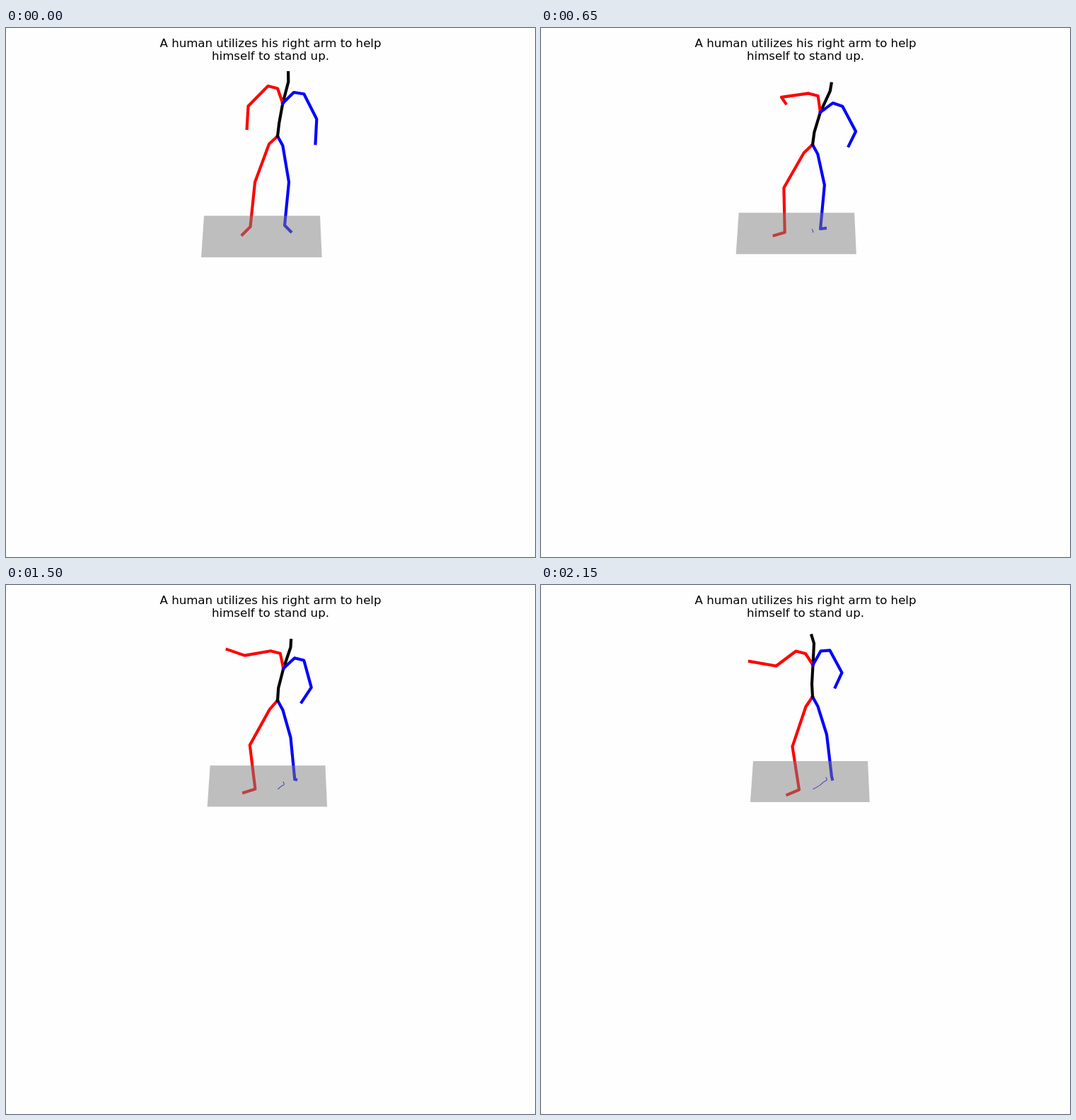
An HTML page for the animation above (2200 ms loop, 748 by 748 pixels).

```html
<!DOCTYPE html>
<html lang="en">
<head>
<meta charset="utf-8">
<title>Standing up</title>
<style>
  html, body { margin: 0; width: 100%; height: 100%; overflow: hidden; background: #fefefe; }
  svg { display: block; width: 100vw; height: 100vh; }
  text { font: 16.62px "DejaVu Sans", sans-serif; text-anchor: middle; }
  path { fill: none; stroke-width: 4.16; stroke-linecap: square; stroke-linejoin: round; }
  .right { stroke: #f00; }
  .left { stroke: #00f; }
  .spine { stroke: #000; }
  #trail { stroke: #00f; stroke-width: 1.04; }
  #floor { fill: rgba(128, 128, 128, .5); }
</style>
</head>
<body>
<svg viewBox="0 0 748 748">
  <text x="374" y="27">A human utilizes his right arm to help</text>
  <text x="374" y="45">himself to stand up.</text>
  <path id="rightLeg" class="right"/>
  <path id="leftLeg" class="left"/>
  <path id="spine" class="spine"/>
  <path id="rightArm" class="right"/>
  <path id="leftArm" class="left"/>
  <path id="trail"/>
  <polygon id="floor"/>
</svg>
<script>
const LOOP = 2200, STEP = 50, LAST = LOOP - STEP;

// A motion is a few [x, y] points spread evenly over the loop.
// Each bone is the motion of its far end, seen from its near end.
const pelvis = [[384, 153], [384, 165.6], [384, 163.6], [384, 158]];
const bones = {
  spine: {
    belly: [[2.2, -18.7], [2, -17.5], [-1, -18]],
    chest: [[5.1, -27.8], [8.7, -28], [1.5, -27]],
    neck: [[8, -30.5], [14, -30], [10.8, -30], [1.5, -30.5]],
    head: [[-.2, -13], [1.7, -9.7], [-3.4, -11.2]]
  },
  rightLeg: {
    hip: [[-12, 11], [-12, 12], [-9.5, 14]],
    knee: [[-20, 54], [-29.7, 49], [-19, 56.5]],
    ankle: [[-6.5, 63], [5, 62.6], [9.5, 61]],
    toe: [[-11.3, 11.3], [-15.3, 4.2], [-16.2, 5], [-16.6, 7]]
  },
  leftLeg: {
    hip: [[7.3, 13.2]],
    knee: [[8.7, 51.8], [10.3, 40.6], [12.7, 40.3]],
    ankle: [[-6, 61], [-5.3, 62], [5.3, 59.5], [7, 59.5]],
    toe: [[8.6, 8.8], [6.5, -1.3], [2, 0], [.9, 3.5]]
  },
  rightArm: {
    collar: [[-7.3, -21], [-3, -23], [-10.5, -16]],
    shoulder: [[-13.5, -3.5]],
    elbow: [[-28, 28.5], [-37.5, 7], [-38, 6.5], [-36, 7.5], [-28, 21]],
    wrist: [[-1.9, 31.5], [5, 12], [5, -1], [-31, -9.5], [-37.5, -6.5]]
  },
  leftArm: {
    collar: [[15.7, -15.5], [17.3, -13.3], [11, -19.6]],
    shoulder: [[14.3, 2.3], [13.4, 4.6], [13, -1]],
    elbow: [[18, 35.5], [18.5, 35.7], [10.5, 38.6], [17, 31.5]],
    wrist: [[-1.8, 34.5], [-9.5, 22], [-10.5, 18.3], [-14, 21.3], [-9.5, 20.7]]
  }
};
const drift = [[0, 0], [-1, -3.9], [2.7, -6], [9.7, -11.7], [19, -16.9]];

// Catmull-Rom curve; the ends are continued as parabolas.
function follow(points, t) {
  const n = points.length - 1;
  if (!n) return points[0];
  const s = t / LAST * n, i = Math.min(Math.floor(s), n - 1), u = s - i;
  return [0, 1].map(c => {
    const p = k => points[k][c];
    const a = i > 0 ? p(i - 1) : 3 * p(0) - 3 * p(1) + p(2);
    const b = p(i), d = p(i + 1);
    const e = i + 2 <= n ? p(i + 2) : 3 * p(n) - 3 * p(n - 1) + p(n - 2);
    return b + u / 2 * (d - a + u * (2 * a - 5 * b + 4 * d - e + u * (3 * (b - d) + e - a)));
  });
}

const el = id => document.getElementById(id);
const toPath = joints =>
  joints.length ? "M" + joints.map(p => p.map(v => v.toFixed(2)).join()).join(" ") : "";

// Adds the bones of a limb end to end, draws it and returns its joints.
function drawLimb(name, root, t) {
  const joints = [root];
  for (const bone of Object.values(bones[name])) {
    const [x, y] = joints[joints.length - 1], [dx, dy] = follow(bone, t);
    joints.push([x + dx, y + dy]);
  }
  el(name).setAttribute("d", toPath(joints));
  return joints;
}

// The path walked so far, carried along by the floor.
function drawTrail(x, y, t) {
  const steps = t > STEP ? t / STEP : 0;
  const joints = Array.from({ length: steps }, (_, k) => {
    const [px, py] = follow(drift, k * STEP);
    return [384 + x - px, 289 + y - py];
  });
  el("trail").setAttribute("d", toPath(joints));
}

// The floor shrinks slightly as it moves away.
function drawFloor(x, y) {
  const size = 1 + y * .00068;
  const corner = (dx, dy) => [361.7 + x + dx * size, 294.85 + y + dy * size];
  el("floor").setAttribute("points", [
    corner(-81.7, -29.35), corner(82.3, -29.35), corner(85, 29.35), corner(-85.7, 29.35)
  ].join(" "));
}

function render(t) {
  const root = follow(pelvis, t), [x, y] = follow(drift, t);
  const chest = drawLimb("spine", root, t)[2];
  drawLimb("rightLeg", root, t);
  drawLimb("leftLeg", root, t);
  drawLimb("rightArm", chest, t);
  drawLimb("leftArm", chest, t);
  drawTrail(x, y, t);
  drawFloor(x, y);
}

function tick() {
  render(Math.floor(performance.now() % LOOP / STEP) * STEP);
  requestAnimationFrame(tick);
}
tick();
</script>
</body>
</html>
```
